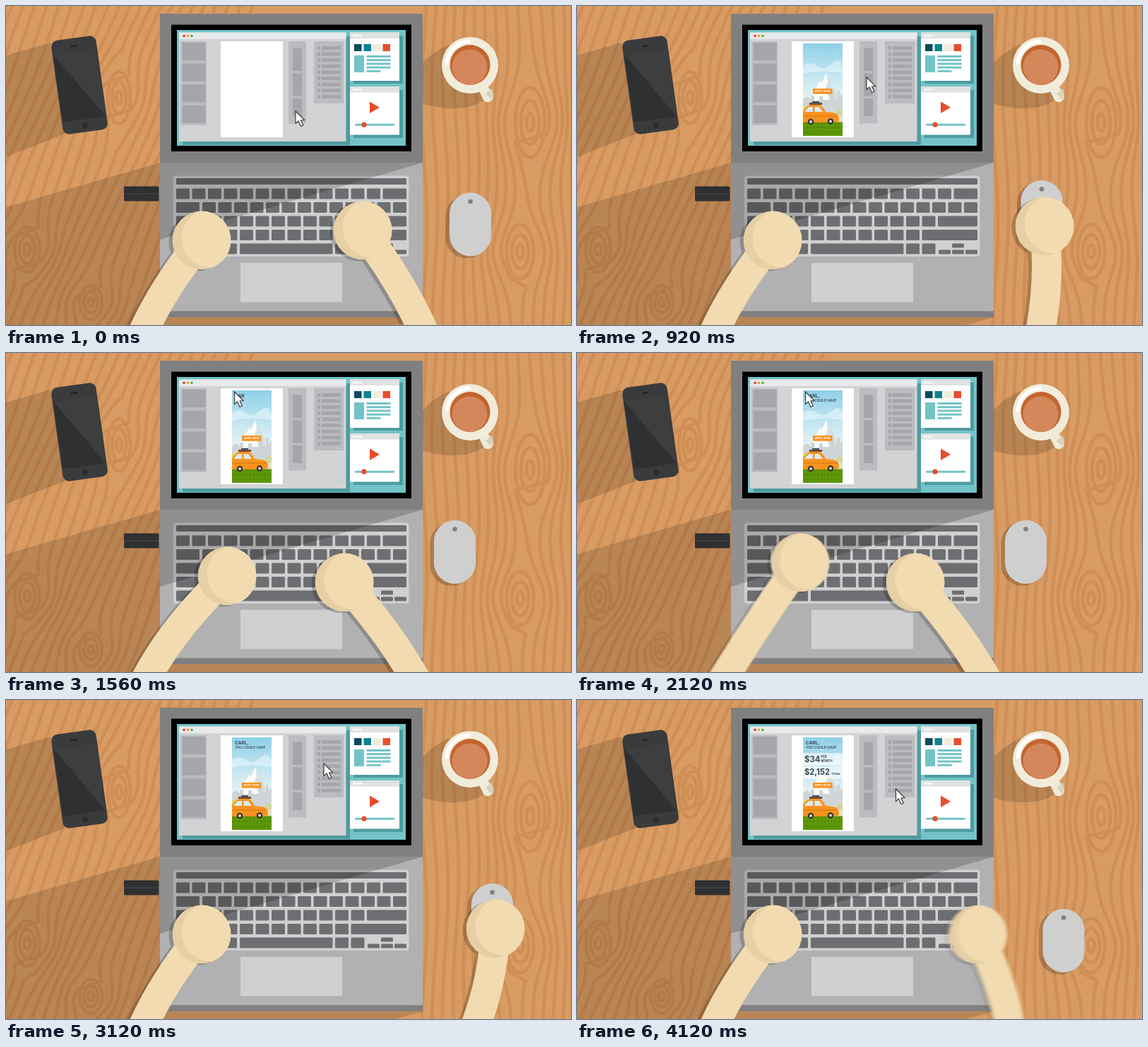
Animation, 800 px wide and 452 px high, one loop 4.16 s. Source, as an HTML page:

```html
<!DOCTYPE html>
<html lang="en">
<head>
<meta charset="utf-8">
<title>Desk</title>
<style>
html, body { margin: 0; width: 100%; height: 100%; overflow: hidden; background: #d79b63; }
svg { display: block; width: 100vw; height: 100vh; }
text { font-family: Inter, "Open Sans", sans-serif; font-weight: 700; fill: #3b4650; }
.shade { fill: #000; opacity: .14; }
.teal { fill: #72c4c8; }
.cell { fill: #a4a6ab; }
.panel { fill: #babcbf; }
.arm { fill: none; stroke-width: 42; }
</style>
</head>
<body>
<svg viewBox="0 0 800 452">
<defs>
  <clipPath id="palm"><circle r="41.5"/></clipPath>
  <clipPath id="ad"><rect x="320" y="53" width="56" height="131"/></clipPath>
  <linearGradient id="sky" x1="0" y1="0" x2="0" y2="1">
    <stop offset="0" stop-color="#8fd0e8"/><stop offset=".35" stop-color="#c3e6f1"/><stop offset=".65" stop-color="#eef5f3"/>
  </linearGradient>
  <filter id="blurRight" filterUnits="userSpaceOnUse" x="300" y="150" width="500" height="400"><feGaussianBlur/></filter>
  <filter id="blurLeft" filterUnits="userSpaceOnUse" x="80" y="150" width="400" height="400"><feGaussianBlur/></filter>
</defs>

<rect width="800" height="452" fill="#d79b63"/>
<g id="grain" fill="none" stroke="#cf8e55" stroke-width="4.5" stroke-linecap="round"></g>

<!-- cast shadows -->
<g class="shade">
  <path d="M63 52L0 70V214L84 181Z"/>
  <path d="M218 222L0 285V452H552L590 441Z"/>
  <path d="M628 54Q600 67 588 84V138Q620 148 650 144Q676 139 688 122Z"/>
</g>

<!-- phone -->
<g transform="translate(104 112) rotate(-8)">
  <rect x="-32" y="-67" width="64" height="134" rx="9" fill="#3a3b3c"/>
  <rect x="-30.5" y="-48" width="61" height="97" fill="#2f3031"/>
  <path d="M-30.5-48H30.5V49Z" fill="#3d3e3f"/>
  <rect x="-5" y="-57" width="10" height="2.5" rx="1" fill="#232425"/>
  <circle cy="58" r="4" fill="#2a2b2c"/>
</g>

<!-- cup -->
<g>
  <path d="M668 116L680 110L690 126Q691 133 684 136Q677 137 675 131Z" fill="#f0ebd8"/>
  <path d="M679 124L688 117L690 126Q690 130 686 132Z" fill="#d9d2bd"/>
  <circle cx="657" cy="84" r="40" fill="#f1ecda"/>
  <path d="M624 83A33 33 0 0 1 657 50" fill="none" stroke="#fff" stroke-width="5"/>
  <circle cx="657" cy="83.500" r="28.500" fill="#c5642f"/>
  <path d="M633 95A25 25 0 1 1 680 95Q673 111 657 112Q640 111 633 95Z" fill="#d4875b"/>
</g>

<!-- memory stick -->
<rect x="167" y="255.500" width="49.500" height="21" rx="1.500" fill="#2f3031"/>
<path d="M167 266H216" stroke="#48494a" stroke-width="1.500" stroke-dasharray="2 1"/>

<!-- laptop -->
<rect x="218" y="11" width="372" height="211" fill="#808080"/>
<rect x="234" y="26.500" width="340" height="179.500"/>
<rect class="teal" x="242" y="34" width="324" height="164"/>
<rect x="218" y="222" width="372" height="210.500" fill="#b1b1b1"/>
<rect x="218" y="432.500" width="372" height="8.500" fill="#808080"/>
<rect x="237" y="240.500" width="333.500" height="114.500" rx="4" fill="#d0d0d0"/>
<g id="keys" fill="#6d6e71"></g>
<rect x="332" y="364" width="144" height="55.500" fill="#d0d0d0"/>
<path d="M218 222H590L218 331Z" opacity=".19"/>

<!-- editor window -->
<g id="shadows" fill="#4f9ba0">
  <rect x="250" y="43" width="237" height="154"/>
  <rect x="492" y="42" width="70" height="68"/>
  <rect x="492" y="119" width="70" height="68"/>
</g>
<rect x="245" y="37.500" width="236.500" height="154.500" fill="#d1d3d4"/>
<rect x="245" y="37.500" width="236.500" height="9.500" fill="#e8e9ea"/>
<circle cx="252" cy="42.300" r="1.800" fill="#e0392b"/><circle cx="257.500" cy="42.300" r="1.800" fill="#f59a23"/><circle cx="263" cy="42.300" r="1.800" fill="#4caf50"/>
<rect class="panel" x="247.500" y="50" width="36.500" height="119"/>
<rect class="panel" x="400" y="50" width="25" height="116.500"/>
<rect class="panel" x="436" y="50" width="42" height="88"/>
<g id="cells" class="cell"></g>
<rect x="304" y="50" width="88" height="136" fill="#fff"/>

<!-- side windows -->
<rect x="487" y="37.500" width="70" height="68.500" fill="#fff"/>
<rect x="487" y="114" width="70" height="68.500" fill="#fff"/>
<g id="bars"></g>
<rect x="493" y="54" width="10.500" height="10" fill="#0b4a5c"/><rect x="506.500" y="54" width="10.500" height="10" fill="#0d8391"/>
<rect x="520" y="54" width="10.500" height="10" fill="#f1ecda"/><rect x="533.500" y="54" width="10.500" height="10" fill="#e84c2e"/>
<g id="article" class="teal"><rect x="493" y="70" width="14" height="24"/></g>
<path d="M515 135.500V152L529 143.700Z" fill="#e84c2e"/>
<rect class="teal" x="494" y="166.700" width="56" height="3" rx="1.500"/>
<circle cx="507" cy="168.200" r="3.600" fill="#e84c2e"/>

<!-- advert -->
<g id="advert" clip-path="url(#ad)">
  <rect x="320" y="53" width="56" height="131" fill="url(#sky)"/>
  <path d="M320 84Q332 78 340 85T360 82T376 86V95Q350 90 320 96Z" fill="#fff" opacity=".4"/>
  <path d="M328 134L344 106L347 108L353 94L357 104L360 107L372 134Z" fill="#f9fbfb"/>
  <path d="M353 94L357 104L360 107L372 134H358L352 116L355 108Z" fill="#d5e0e4"/>
  <path d="M320 150V132L326 128L331 132V127H336V134H343V128H348V133H358V122L361 118L364 124V131H368V120H372V128L376 124V156H320Z" fill="#cfd5d6"/>
  <path d="M320 146Q330 138 344 147T376 145V168H320Z" fill="#dfe3c8"/>
  <circle cx="324" cy="148" r="6" fill="#d9d75a"/><circle cx="372" cy="151" r="5" fill="#cfd5a0"/>
  <rect x="320" y="164.500" width="56" height="20" fill="#5d9608"/>
  <path d="M320 166H376M320 172H376M320 179H376" stroke="#4c8203" stroke-width="2" stroke-dasharray="2 3"/>
  <path d="M329 137H347V140H329Z" fill="#7a4a2b"/><path d="M333 135H343V138H333Z" fill="#4a5560"/>
  <path d="M318 151L326 142Q328 140 332 140H343Q347 140 352 150L365 151.500Q371 153 371 163L366 165H318Z" fill="#f7931e"/>
  <path d="M322 150L328 143H334V150ZM336.500 143H343L348 150H336.500Z" fill="#dcebee"/>
  <path d="M318 156H369" stroke="#d87410" stroke-width="1"/>
  <circle cx="331" cy="164" r="4.200" fill="#333"/><circle cx="331" cy="164" r="2" fill="#ddd"/>
  <circle cx="359" cy="163.500" r="4.200" fill="#333"/><circle cx="359" cy="163.500" r="2" fill="#ddd"/>
  <rect x="334" y="117" width="27.500" height="7.700" fill="#f7931e"/>
  <text x="347.700" y="122.200" text-anchor="middle" font-size="3.700" style="fill:#fff">APPLY NOW</text>
  <text id="name" x="324" y="63" font-size="6.500"></text>
  <text id="offer" x="324" y="69.300" font-size="4.900" font-style="italic" style="font-weight:600"></text>
  <g id="monthly">
    <rect x="320" y="75" width="56" height="17.500" fill="#fff" opacity=".6"/>
    <text x="322" y="87.500" font-size="11.300">$34</text>
    <text x="345.500" y="82.300" font-size="4.200">PER</text>
    <text x="345.500" y="87.500" font-size="4.200">MONTH</text>
  </g>
  <g id="total">
    <rect x="320" y="94" width="56" height="17.500" fill="#fff" opacity=".6"/>
    <text x="322" y="106.300" font-size="11.200">$2,152</text>
    <text x="360" y="106.300" font-size="4">TOTAL</text>
  </g>
</g>

<path id="cursor" d="M0 0V17.500L4 14L7.500 21.500L10.800 20L7.500 13L12.500 12.500Z" fill="#fff" stroke="#3a3a3a" stroke-width="1.200"/>

<g id="mouse">
  <rect x="-35" y="-42" width="59" height="90" rx="29.500" opacity=".2"/>
  <rect x="-29.500" y="-45" width="59" height="90" rx="29.500" fill="#cfcfcf"/>
  <circle cy="-32.500" r="3.300" fill="#808080"/>
</g>
<g id="left"></g>
<g id="right"></g>
</svg>

<script>
const LOOP = 4160, STEP = 40;
const $ = id => document.getElementById(id);
const rect = (x, y, w, h, extra = '') => `<rect x="${x}" y="${y}" width="${w}" height="${h}" ${extra}/>`;
const range = (n, f) => Array.from({ length: n }, (_, i) => f(i)).join('');

// Wood: lines pushed aside by knots, with rings inside each knot
const knots = [[742, 165, 26, 62], [728, 348, 24, 48], [30, 345, 22, 40], [160, 130, 20, 46], [120, 420, 20, 30]];
function grainLine(x0, lean) {
  let d = '';
  for (let y = -10; y <= 462; y += 12) {
    let x = x0 + lean * (226 - y) + 4 * Math.sin(y / 55 + x0 / 40);
    for (const [kx, ky, rx, ry] of knots) {
      const dx = x - kx, dy = y - ky;
      x += Math.sign(dx) * rx * Math.exp(-dx * dx / (3 * rx * rx) - dy * dy / (ry * ry));
    }
    d += (d ? 'L' : 'M') + x.toFixed(1) + ' ' + y;
  }
  return `<path d="${d}"/>`;
}
$('grain').innerHTML =
  range(24, i => grainLine(-110 + i * 16, .4)) +
  range(15, i => grainLine(592 + i * 15, 0)) +
  knots.map(([x, y, rx, ry]) =>
    range(3, i => `<ellipse cx="${x}" cy="${y}" rx="${rx * (.2 + i * .3)}" ry="${ry * (.2 + i * .3)}"/>`)).join('');

// Keyboard
const key = (x, y, w, h = 15) => rect(x, y, w, h, 'rx="1.5"');
const keyRow = (x, y, n) => range(n, i => key(x + i * 22.5, y, 19));
$('keys').innerHTML =
  key(241, 244, 326, 9) +
  keyRow(241, 258.5, 13) + key(533.5, 258.5, 33.5) +
  key(241, 278, 33) + keyRow(278, 278, 13) +
  key(241, 297.5, 41) + keyRow(286, 297.5, 10) + key(511, 297.5, 56) +
  key(241, 317, 41) + keyRow(286, 317, 9) + key(488.5, 317, 78.5) +
  key(241, 336.5, 86) + key(331, 336.5, 131.5) + keyRow(466, 336.5, 2) +
  key(531, 336.5, 17, 6) + range(3, i => key(512 + i * 19, 345.5, 17, 6));

$('cells').innerHTML =
  range(4, i => rect(249.5, 52 + i * 29.6, 33, 25)) +
  rect(406, 59.5, 13, 32.5) + rect(406, 95.5, 13, 32) + rect(406, 131, 13, 25) +
  range(9, i => rect(441, 57 + i * 8.6, 4, 5) + rect(447, 57 + i * 8.6, 27, 5));
$('bars').innerHTML = [37.5, 114].map(y => rect(487, y, 70, 8.5, 'fill="#e0e1e3"') +
  range(3, i => `<circle cx="${493 + i * 4.4}" cy="${y + 4.5}" r="1.8" fill="#fff"/>`)).join('');
$('article').innerHTML += range(5, i => rect(510.5, 70 + i * 5.2, i < 4 ? 34 : 20, 3));

for (const id of ['left', 'right']) $(id).innerHTML = `
  <g opacity=".2" transform="translate(-5 2)"><path class="arm" stroke="#000"/><circle class="palm" r="41.5"/></g>
  <path class="arm" stroke="#f2dbb0"/>
  <g class="palm"><circle r="41.5" fill="#e6cfa5"/><circle cx="13" cy="-3" r="41.5" fill="#f2dbb0" clip-path="none"/></g>`;
for (const g of document.querySelectorAll('g.palm')) g.setAttribute('clip-path', 'url(#palm)');

// Keyed motion: time, then values
const rightKeys = [
  [40, 505, 318], [440, 662, 329], [800, 662, 312], [960, 662, 312], [1200, 640, 302],
  [1480, 479, 325], [1560, 479, 325], [1680, 472, 313], [1800, 479, 325], [1960, 484, 312],
  [2120, 479, 325], [2240, 473, 315], [2360, 479, 325], [2680, 640, 302], [3080, 693, 324],
  [3280, 693, 324], [3600, 693, 361], [3700, 693, 361], [4390, 505, 318]];
const leftKeys = [
  [1040, 277, 332], [1200, 300, 306], [1320, 292, 324], [1440, 316, 300], [1560, 313, 316],
  [1680, 300, 322], [1800, 316, 298], [1920, 308, 314], [2020, 296, 318], [2120, 316, 297],
  [2240, 306, 310], [2360, 314, 300], [2570, 277, 332]];
// mouse x, y and pointer x, y
const pointKeys = [
  [440, 657.5, 309.5, 410, 149], [800, 658, 292, 410, 101], [960, 658, 292, 410, 101],
  [1200, 635.5, 282, 323.5, 55], [2680, 635.5, 282, 323.5, 55], [3080, 688.5, 305, 450, 90],
  [3280, 688.5, 305, 450, 90], [3600, 689, 341, 451.5, 126]];

function at(keys, t) {
  if (t <= keys[0][0]) return keys[0].slice(1);
  const i = keys.findIndex(k => k[0] > t);
  if (i < 0) return keys[keys.length - 1].slice(1);
  const a = keys[i - 1], b = keys[i];
  const p = (1 - Math.cos(Math.PI * (t - a[0]) / (b[0] - a[0]))) / 2;
  return a.slice(1).map((v, j) => v + (b[j + 1] - v) * p);
}

const move = (el, x, y) => el.setAttribute('transform', `translate(${x} ${y})`);

function poseHand(id, filterId, keys, t, base, bow) {
  const [x, y] = at(keys, t), g = $(id);
  const bx = base(x, y), ex = bx + (bx - x) * .1, ey = 452 + (452 - y) * .1;
  const d = `M${x} ${y}Q${(x + ex) / 2 + 2 * bow(x, y)} ${(y + ey) / 2} ${ex} ${ey}`;
  g.querySelectorAll('.arm').forEach(p => p.setAttribute('d', d));
  g.querySelectorAll('.palm').forEach(p => move(p, x, y));
  const blur = Math.abs(x - at(keys, t - STEP)[0]) * .15;
  $(filterId).firstElementChild.setAttribute('stdDeviation', `${blur} ${blur / 4}`);
  if (blur > .8) g.setAttribute('filter', `url(#${filterId})`);
  else g.removeAttribute('filter');
}

const typed = (text, t, start, pace) => text.slice(0, Math.max(0, Math.floor((t - start) / pace)));
const fade = (id, t, start, span) =>
  $(id).setAttribute('opacity', Math.min(1, Math.max(0, (t - start) / span)));

function draw(t) {
  const [mx, my, cx, cy] = at(pointKeys, t);
  move($('mouse'), mx, my);
  move($('cursor'), cx, cy);
  poseHand('right', 'blurRight', rightKeys, t,
    (x, y) => 572 + (x - 479) * .44 - (y - 325) * .25, () => 6);
  poseHand('left', 'blurLeft', leftKeys, t,
    (x, y) => 201 - (y - 332) * .37, (x, y) => -6 - (x - 277) * .32 - (y - 332) * .47);
  $('name').textContent = typed('CARL,', t, 1440, 40);
  $('offer').textContent = typed('YOU COULD SAVE', t, 1680, 31);
  fade('advert', t, 780, 100);
  fade('monthly', t, 3160, 120);
  fade('total', t, 3600, 120);
}

const begin = performance.now();
function tick() {
  const t = (performance.now() - begin) % LOOP;
  draw(Math.floor(t / STEP) * STEP);
  requestAnimationFrame(tick);
}
tick();
</script>
</body>
</html>
```
